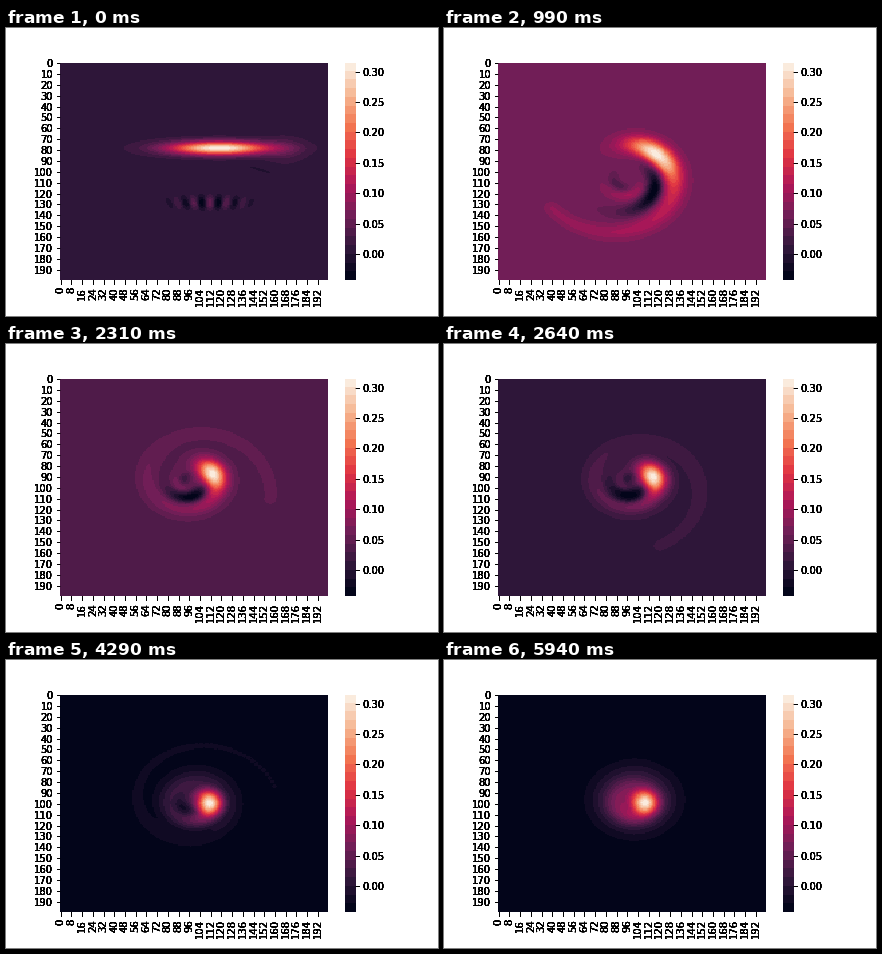
A matplotlib script for the animation above (6270 ms loop, 432x288 px).

```python
import numpy as np
import matplotlib.pyplot as plt
from matplotlib.animation import FuncAnimation
from matplotlib.colors import LinearSegmentedColormap, ListedColormap

plt.rcParams["font.family"] = "DejaVu Sans"
plt.rcParams["font.size"] = 10

FRAMES, INTERVAL = 19, 330
SIZE, LEVELS = 200, 25
LOW, HIGH = -0.0429, 0.3151

ROCKET = ["#03051a", "#35193e", "#701f57", "#ad1759",
          "#e13342", "#f37651", "#f6b48f", "#faebdd"]
smooth = LinearSegmentedColormap.from_list("smooth", ROCKET)
banded = ListedColormap(smooth(np.linspace(0, 1, LEVELS)))

gy, gx = np.mgrid[0:SIZE, 0:SIZE] + 0.5


def bump(x, y, wx, wy):
    return np.exp(-((gx - x) / wx) ** 2 / 2 - ((gy - y) / wy) ** 2 / 2)


def bell(x, width):
    return np.exp(-(x / width) ** 2 / 2)


def ridge(centre, angles, radii, heights, widths):
    """Envelope of round bumps along a curve in polar form."""
    xs = centre[0] + radii * np.cos(np.radians(angles))
    ys = centre[1] + radii * np.sin(np.radians(angles))
    out = np.zeros((SIZE, SIZE))
    for x, y, h, w in zip(xs, ys, heights, widths):
        np.maximum(out, h * bump(x, y, w, w), out=out)
    return out


def squeezed():
    """Long flat state with its interference fringes."""
    wave = np.cos(2 * np.pi * (gx - 112) * (1 + 0.012 * (gy - 129)) / 12.3)
    return (bump(119, 79, 26, 4.2) + 0.08 * bump(168, 81, 10, 8)
            + 0.15 * bump(111, 129, 18, 4) * wave
            - 0.035 * bump(150, 99 + 0.4 * (gx - 150), 8, 1.2))


def spiral(t):
    """State wound up by rotation that is faster further out."""
    # The centre of the swirl circles the middle and settles there
    turn = np.radians(22 + 31 * t)
    drift = 9 * np.exp(-(t / 9) ** 3)
    centre = 100 + drift * np.cos(turn), 100 + drift * np.sin(turn)

    head = min(0, 6 * t - 64)
    sweep = 55 * t - 10 - head
    inner = min(32, 9.5 + 46 * np.exp(-t / 4.2))
    spread = 24 + 30 * np.exp(-t / 1.5)

    def radius(theta):
        return inner + (62 - inner) * np.clip(theta / sweep, 0, 1) ** 1.8

    # Bright head with a tail that fades along the arm
    theta = np.linspace(-2.5 * spread, sweep, 200)
    floor = 0.05 * min(1, (18 - t) / 5)
    tail = np.maximum(0.5 * np.exp(-theta / 120), floor)
    tail = np.where(theta < 0, 0.5 * bell(theta, spread), tail)
    heights = 0.5 * bell(theta, spread) + tail
    widths = 6.5 * (1 - 0.4 * np.clip(theta / sweep, 0, 1) ** 2)
    f = ridge(centre, head + theta, radius(theta), heights, widths)

    # Ripples of alternating sign inside the arm
    depth = np.interp(t, [0, 2, 10, 13, 18], [0, 0.45, 0.45, 0.22, 0])
    offset = np.linspace(-100, 130, 50)
    for n in range(3):
        theta = 45 + 8 * t + 60 * n + offset
        strength = depth * (1, 0.35, 0.3)[n]
        ripple = ridge(centre, head + theta,
                       0.62 ** (n + 1) * radius(theta - 60 * n),
                       strength * bell(offset, 45),
                       np.full(50, 4.6 - 0.8 * n))
        f -= (-1) ** n * ripple

    # Round glow of the steady state
    return f + 0.5 * (t / 18) ** 2.5 * bump(102, 97, 18, 18)


def field(i):
    f = spiral(i) if i else squeezed()
    # Stretch both signs so that each frame fills the colour range
    zero = np.interp(i, [0, 1, 6, 7, 8, 11, 12],
                     [0.14, 0.3, 0.3, 0.22, 0.14, 0.09, 0])
    up = f * (1 - zero) / f.max()
    down = f * zero / max(-f.min(), 1e-6)
    return np.clip(zero + np.where(f > 0, up, down), 0, 1)


def map_axes(**kw):
    ax = fig.add_axes([0.125, 0.125, 0.62, 0.755], **kw)
    xs, ys = np.arange(0, SIZE, 8), np.arange(0, SIZE, 10)
    ax.set_xlim(0, SIZE)
    ax.set_ylim(SIZE, 0)
    ax.set_xticks(xs + 0.5, xs, rotation=90)
    ax.set_yticks(ys + 0.5, ys)
    return ax


def bar_axes(**kw):
    ax = fig.add_axes([338.6 / 432, 0.125, 10.87 / 432, 0.755], **kw)
    ticks = np.arange(0, 0.31, 0.05)
    ax.set_xlim(0, 1)
    ax.set_ylim(LOW, HIGH)
    ax.set_xticks([])
    ax.yaxis.tick_right()
    ax.set_yticks(ticks, [f"{t:.2f}" for t in ticks])
    return ax


fig = plt.figure(figsize=(6, 4), dpi=72, facecolor="white")

# Stacked copies make the small labels solid black
for n in range(8):
    heat_ax = map_axes(frameon=False, label=f"map{n}")
    bar_ax = bar_axes(frameon=False, label=f"bar{n}")

fields = [field(i) for i in range(FRAMES)]
heat = heat_ax.imshow(fields[0], cmap=banded, vmin=0, vmax=1, aspect="auto",
                      extent=(0, SIZE, SIZE, 0), interpolation="nearest")
bar_ax.imshow(np.arange(LEVELS)[:, None], cmap=banded, aspect="auto",
              origin="lower", extent=(0, 1, LOW, HIGH),
              interpolation="nearest")


def update(i):
    heat.set_data(fields[i])
    return [heat]


anim = FuncAnimation(fig, update, frames=FRAMES, interval=INTERVAL,
                     repeat=True, repeat_delay=0)
plt.show()
```
